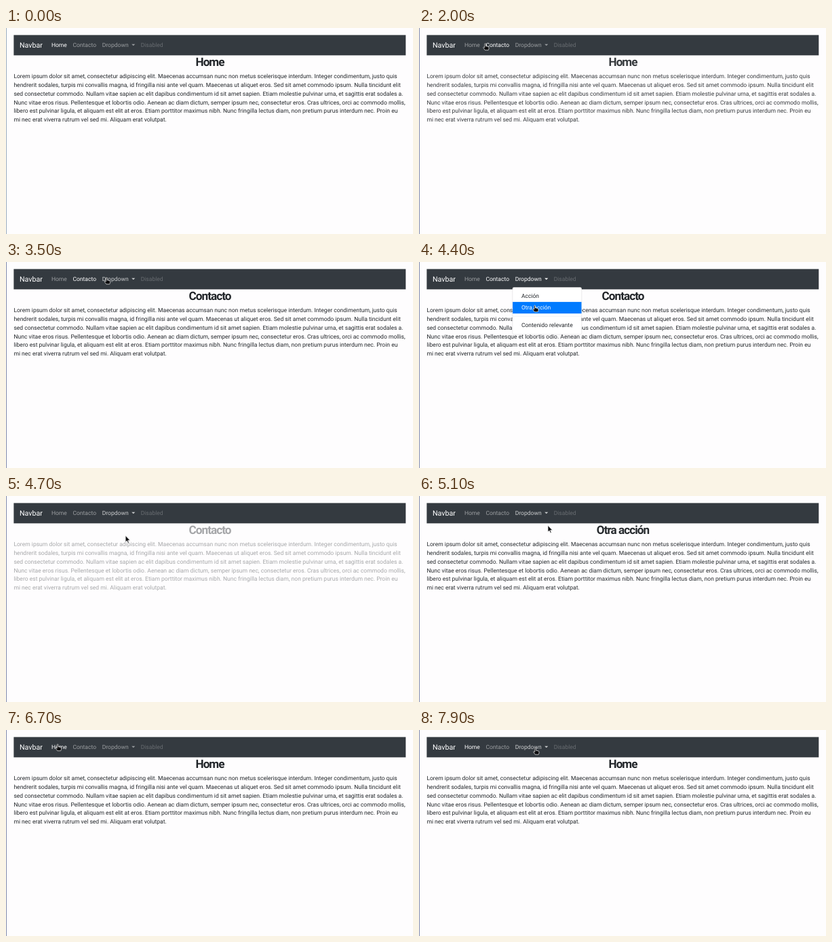
An HTML page that plays this animation: 600x304 px, repeating every 8000 ms.

```html
<!DOCTYPE html>
<html lang="es">
<head>
<meta charset="utf-8">
<title>Navbar</title>
<style>
  html, body { margin: 0; width: 100%; height: 100%; overflow: hidden; background: #fefdfe; }
  svg { display: block; width: 600px; height: 304px; }
  text {
    font: 8.557px Roboto, Arial, sans-serif;
    fill: #212529;
    white-space: pre;
    text-rendering: geometricPrecision;
  }
  .brand { font-size: 10.696px; fill: #fff; }
  .title { font-size: 17.114px; font-weight: 700; letter-spacing: -.96px; text-anchor: middle; }
  .link text, .link path { fill: #fff; }
</style>
</head>
<body>
<svg viewBox="0 0 600 304">
  <rect width="600" height="304" fill="#fefdfe"/>
  <rect id="edge" width="1" height="304"/>
  <rect x="11.4" y="10.4" width="577.9" height="29.95" fill="#343a40"/>
  <text class="brand" x="20" y="28.8">Navbar</text>
  <g id="nav"></g>
  <g id="page"><text id="title" class="title" x="300.5" y="56.2"></text></g>
  <g id="menu">
    <rect x="137.8" y="37.3" width="102" height="69.6" rx="2" fill="#fff" stroke="#000" stroke-opacity=".15" stroke-width=".53"/>
    <rect id="pressed" x="138.1" y="58.9" width="101.4" height="17.1" fill="#007bff"/>
    <rect x="138.1" y="80.2" width="101.4" height=".53" fill="#e9ecef"/>
    <text x="150.9" y="53.1">Acción</text>
    <text id="choice" x="150.9" y="70.2">Otra acción</text>
    <text x="150.9" y="96.4">Contenido relevante</text>
  </g>
  <g id="cursor" fill="#0c0c0e" stroke="#fff" stroke-width=".65" stroke-linejoin="round">
    <path id="arrow" d="M0 0V9.6L2.2 7.6 3.7 11 5.2 10.4 3.7 7.1H6.8Z"/>
    <path id="hand" d="M-1.7 1.3a.85 .85 0 0 1 1.7 0V4.2l3.5 .7q1 .3 1 1.3V8.2l-.8 2H-1.2L-3.5 7q-.6-1.2 .5-1.3l1.3 .7Z"/>
  </g>
</svg>
<script>
const LOOP = 8000, STEP = 100, FADE = 300;
const NS = 'http://www.w3.org/2000/svg';
const $ = id => document.getElementById(id);

function add(parent, tag, attrs, text) {
  const el = document.createElementNS(NS, tag);
  for (const k in attrs) el.setAttribute(k, attrs[k]);
  if (text) el.textContent = text;
  return parent.appendChild(el);
}

const lines = [
  'Lorem ipsum dolor sit amet, consectetur adipiscing elit. Maecenas accumsan nunc non metus scelerisque interdum. Integer condimentum, justo quis',
  'hendrerit sodales, turpis mi convallis magna, id fringilla nisi ante vel quam. Maecenas ut aliquet eros. Sed sit amet commodo ipsum. Nulla tincidunt elit',
  'sed consectetur commodo. Nullam vitae sapien ac elit dapibus condimentum id sit amet sapien. Etiam molestie pulvinar urna, et sagittis erat sodales a.',
  'Nunc vitae eros risus. Pellentesque et lobortis odio. Aenean ac diam dictum, semper ipsum nec, consectetur eros. Cras ultrices, orci ac commodo mollis,',
  'libero est pulvinar ligula, et aliquam est elit at eros. Etiam porttitor maximus nibh. Nunc fringilla lectus diam, non pretium purus interdum nec. Proin eu',
  'mi nec erat viverra rutrum vel sed mi. Aliquam erat volutpat.'
];
lines.forEach((s, i) => add($('page'), 'text', { x: 11.4, y: 74.1 + 12.835 * i }, s));

// name, text x, right end of the clickable area
const links = [['Home', 66.9, 94], ['Contacto', 98.4, 137.4], ['Dropdown', 141.7, 194.6], ['Disabled', 198.7, 236]]
  .map(([name, x, end]) => {
    const g = add($('nav'), 'g', { class: 'link' });
    add(g, 'text', { x, y: 28 }, name);
    if (name === 'Dropdown') add(g, 'path', { d: 'M185.2 23.8h5.13l-2.56 2.56Z' });
    return { name, g, x0: x - 4.28, x1: end };
  });

const clicks = [[1940, 'Contacto'], [4530, 'Otra acción'], [6110, 'Home']];
const menuOpen = 3650, menuClose = 4530, pressAt = 4350;

// time, x, y of the pointer tip
const path = [
  [400, 368, 0], [1200, 86, 12], [1300, 79, 22], [1400, 79, 22], [1800, 98.5, 22.5],
  [2900, 98.5, 22.5], [3500, 149, 22.5], [3800, 149, 22.5], [4200, 171.5, 63.5],
  [4500, 171.5, 63.5], [5100, 190, 43.5], [5200, 190, 43], [5600, 66, 22],
  [5700, 66, 22], [6000, 77, 20.5], [6900, 77, 20.5], [7200, 140, 62],
  [7400, 190, 74], [7600, 200, 27], [7700, 200, 27], [7900, 172.5, 26]
];

const swing = p => .5 - Math.cos(Math.PI * Math.min(1, Math.max(0, p))) / 2;

function pointer(t) {
  const i = path.findIndex(k => k[0] > t);
  if (i < 0) return path[path.length - 1].slice(1);
  if (i === 0) return path[0].slice(1);
  const [t0, x0, y0] = path[i - 1], [t1, x1, y1] = path[i];
  const p = swing((t - t0) / (t1 - t0));
  return [x0 + (x1 - x0) * p, y0 + (y1 - y0) * p];
}

function pageState(t) {
  let title = 'Home', active = 'Home', opacity = 1;
  for (const [at, name] of clicks) {
    if (t < at) break;
    active = name;
    const fadingOut = t < at + FADE;
    opacity = fadingOut ? 1 - swing((t - at) / FADE) : swing((t - at - FADE) / FADE);
    if (!fadingOut) title = name;
  }
  return { title, active, opacity };
}

function linkAlpha(name, active, hovered, t, open) {
  if (name === 'Disabled') return .25;
  if (name === active) return 1;
  if (name === 'Dropdown') {
    if (open) return 1;
    if (t >= menuClose && t < clicks[2][0]) return .75;
  }
  return hovered ? .75 : .5;
}

function draw(t) {
  const { title, active, opacity } = pageState(t);
  const open = t >= menuOpen && t < menuClose;
  const pressed = open && t >= pressAt;
  const shown = t >= 400;
  const [x, y] = pointer(t);
  const over = links.find(l => shown && l.name !== 'Disabled' &&
    x >= l.x0 && x < l.x1 && y > 14.3 && y < 35.7);
  const hand = over || (open && y > 41);

  $('title').textContent = title;
  $('page').setAttribute('opacity', opacity);
  for (const l of links) l.g.setAttribute('opacity', linkAlpha(l.name, active, l === over, t, open));

  $('menu').setAttribute('visibility', open ? 'visible' : 'hidden');
  $('pressed').setAttribute('visibility', pressed ? 'visible' : 'hidden');
  $('choice').style.fill = pressed ? '#fff' : '#212529';
  $('edge').setAttribute('fill', t < 1500 ? '#9aabbf' : '#8089ad');

  $('cursor').setAttribute('display', shown ? 'inline' : 'none');
  $('cursor').setAttribute('transform', `translate(${x} ${y})`);
  $('hand').setAttribute('display', hand ? 'inline' : 'none');
  $('arrow').setAttribute('display', hand ? 'none' : 'inline');
}

const start = performance.now();
function tick() {
  const t = Math.max(0, performance.now() - start) % LOOP;
  draw(Math.floor(t / STEP) * STEP);
  requestAnimationFrame(tick);
}
tick();
</script>
</body>
</html>
```
